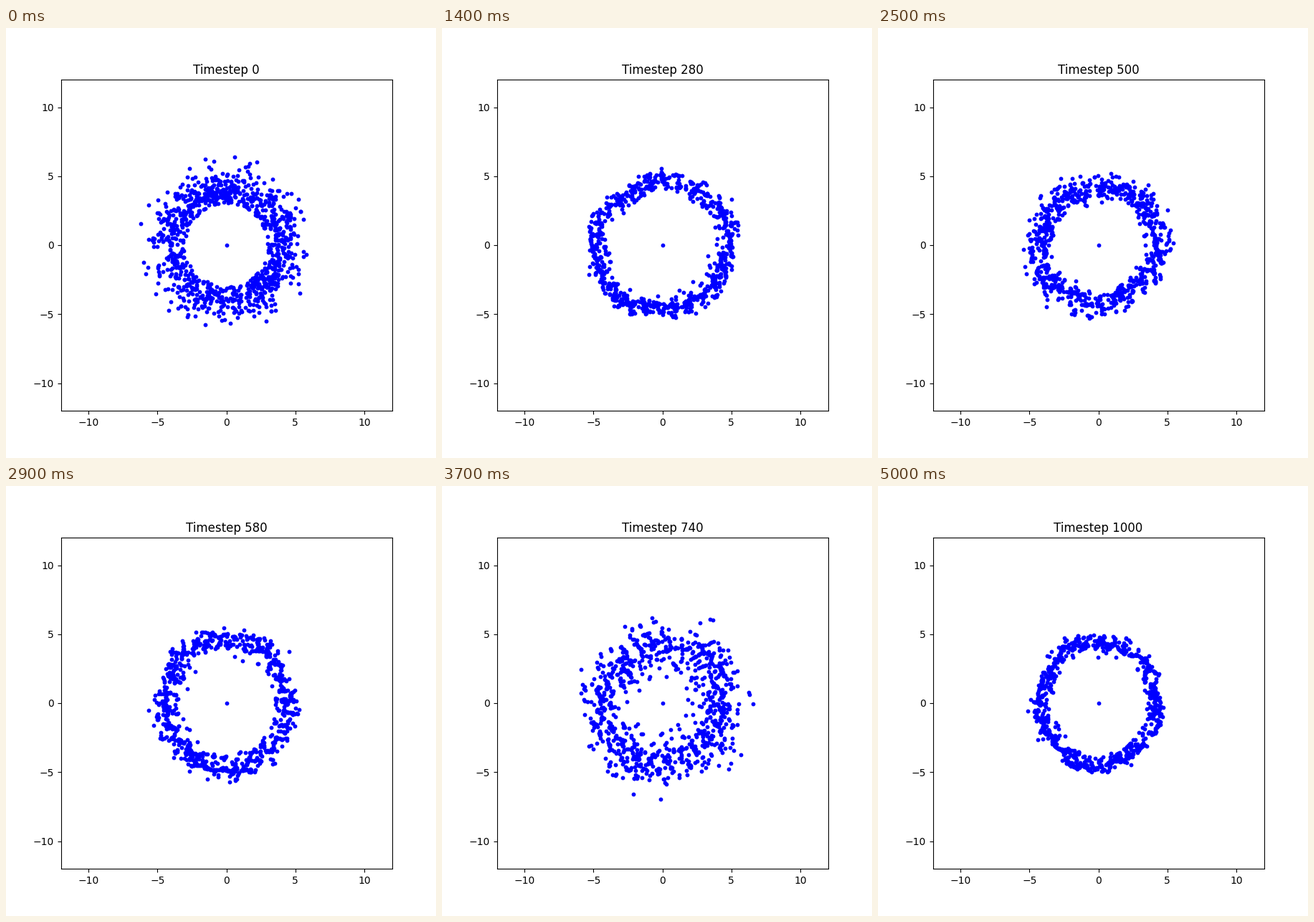
A matplotlib script that plays this animation: 600 px wide and 600 px high, repeating every 5.05 s.

```python
import numpy as np
import matplotlib.pyplot as plt
from matplotlib.animation import FuncAnimation

COUNT = 1000
FRAMES = 101
PERIOD = 43              # frames per orbit and per radial swing
SPIN = 2 * np.pi / PERIOD
WAVES = 12

rng = np.random.default_rng(7)

# Ring with a sharp inner edge at 3 and a thin outer tail.
start = rng.normal(4, 0.95, 4 * COUNT)
start = start[start > 3][:COUNT]
angle = rng.uniform(0, 2 * np.pi, COUNT)
guide = 4.6 + 0.15 * (start - 4)
swing = start - guide
shear = rng.normal(0, 0.05, COUNT)

# Individual scatter plus a part shared by neighbours.
scatter = np.clip(rng.standard_t(5, COUNT), -3, 3) + 0.5 * np.sin(9 * angle)

# Ripples that gather the bodies into small clumps.
wave_dir = rng.uniform(0, 2 * np.pi, WAVES)
wave_len = rng.uniform(5, 9, WAVES)
wave_phase = rng.uniform(0, 2 * np.pi, WAVES)
unit = np.array((np.cos(wave_dir), np.sin(wave_dir)))


def clump(x, y, strength):
    p = np.column_stack((x, y))
    push = strength / wave_len * np.sin(p @ (unit * wave_len) + wave_phase)
    return (p - push @ unit.T).T


def positions(t):
    ramp = min(1, t / 20)
    phase = SPIN * t
    fade = np.where(swing < 0, np.exp(-t / 180), 1)
    spread = 0.2 + 0.5 * np.exp(-((t - 74) / 12) ** 2)

    a = angle + shear * phase - 2 * swing * fade / guide * np.sin(phase)
    r = guide - 0.004 * t + swing * fade * np.cos(phase)
    r += ramp * (spread * scatter
                 + 0.15 * np.cos(2 * a + 1) + 0.12 * np.cos(5 * a))

    # Clumps live in the rotating frame, then everything is turned.
    x, y = clump(r * np.cos(a), r * np.sin(a), 0.4 * ramp)
    c, s = np.cos(phase), np.sin(phase)
    return np.column_stack((c * x - s * y, s * x + c * y))


fig, ax = plt.subplots(figsize=(6, 6), dpi=100)
ax.set_aspect("equal")
ax.set_xlim(-12, 12)
ax.set_ylim(-12, 12)
ax.set_xticks(range(-10, 11, 5))
ax.set_yticks(range(-10, 11, 5))
ax.scatter(0, 0, s=10, color="blue")
dots = ax.scatter(*positions(0).T, s=10, color="blue")
title = ax.set_title("Timestep 0")


def update(i):
    dots.set_offsets(positions(i))
    title.set_text(f"Timestep {10 * i}")
    return dots, title


anim = FuncAnimation(fig, update, frames=FRAMES, interval=50, repeat=True,
                     repeat_delay=0)
plt.show()
```
